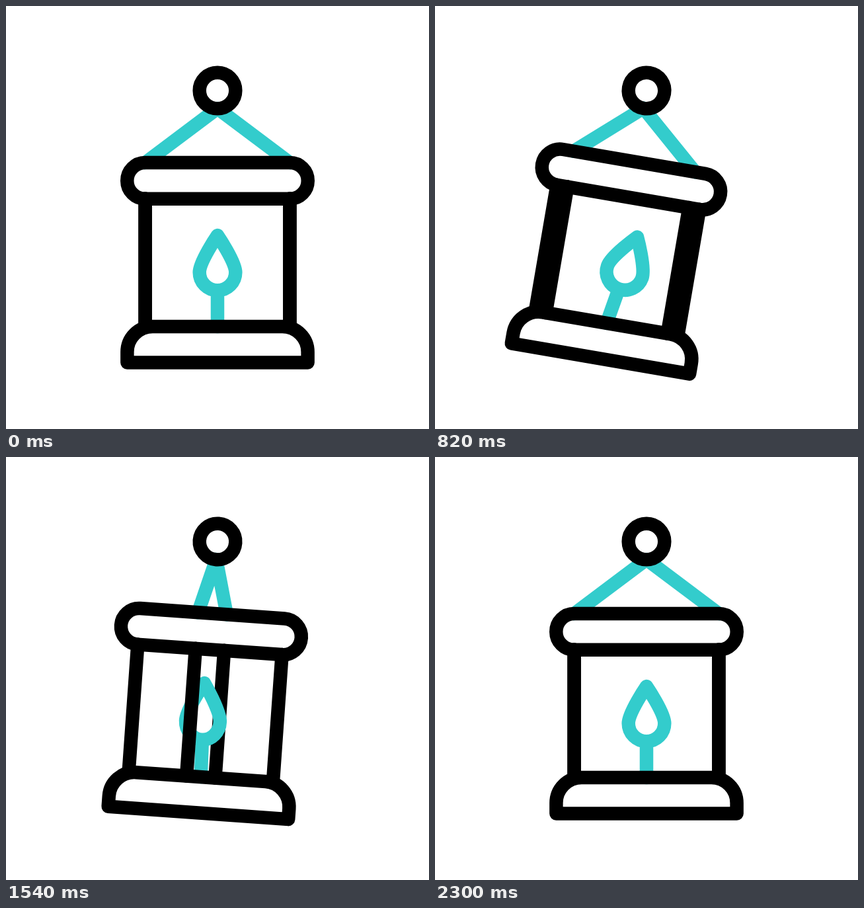
These frames come from a looping animation (640 px wide and 640 px high, 2.4 s). An HTML page with a canvas:

```html
<!DOCTYPE html>
<html lang="en">
<head>
<meta charset="utf-8">
<title>Swinging lantern</title>
<style>
  html, body { margin: 0; width: 100%; height: 100%; overflow: hidden; background: #fff; }
  canvas { display: block; width: 640px; height: 640px; }
</style>
</head>
<body>
<canvas id="stage" width="640" height="640"></canvas>
<script>
const ctx = document.getElementById('stage').getContext('2d');
const LOOP = 2400, STEP = 20, LAST = 2300;
const BLACK = '#000', TEAL = '#33cccc';
const PIVOT = { x: 320, y: 128 };
const HALF = 109.4;    // half distance between the side pillars
const RING = 27.3;
const TURN = 983;      // duration of one half turn of the cage
const WICK_Y = 357;    // foot of the wick, below the pivot

// Tracks of [time, value], eased between neighbours
const SWING = [[0, 0], [600, 22.7], [1165, -15.8], [1724, 10.8], [2240, 0]];
const LEAN = [[0, 0], [710, 11.8], [1275, -8], [1800, 4], [2280, 0]];
const WIDTH = [[0, 1], [300, 1.11], [620, 0.93], [1020, 1.1], [1540, 0.95], [1980, 1.09], [2280, 1]];
const HEIGHT = [[0, 1], [300, 1], [620, 1.05], [1020, 0.955], [1540, 1.03], [1980, 1], [2280, 1]];

const smooth = p => p * p * (3 - 2 * p);
const radians = deg => deg * Math.PI / 180;

function valueAt(track, t) {
  const next = track.findIndex(key => key[0] > t);
  if (next < 0) return track[track.length - 1][1];
  const [t0, v0] = track[next - 1], [t1, v1] = track[next];
  return v0 + (v1 - v0) * smooth((t - t0) / (t1 - t0));
}

// Horizontal place of the front pillar, travelling right to left
function frontPillar(t) {
  if (t >= 2 * TURN) return HALF;
  return HALF * (1 - 2 * smooth((t % TURN) / TURN));
}

function stroke(color) {
  ctx.strokeStyle = color;
  ctx.stroke();
}

function line(color, ...points) {
  ctx.beginPath();
  points.forEach(([x, y]) => ctx.lineTo(x, y));
  stroke(color);
}

const pillar = x => line(BLACK, [x, 163.6], [x, 357]);

// The outline bends and scales, the line weight does not
function flame(t) {
  ctx.save();
  ctx.translate(0, WICK_Y);
  ctx.rotate(radians(valueAt(LEAN, t)));
  ctx.scale(valueAt(WIDTH, t), valueAt(HEIGHT, t));
  ctx.beginPath();
  ctx.moveTo(0, 0);
  ctx.lineTo(0, -54.7);
  ctx.moveTo(0, -138);
  ctx.bezierCurveTo(0, -138, RING, -98, RING, -82);
  ctx.arc(0, -82, RING, 0, Math.PI);
  ctx.bezierCurveTo(-RING, -98, 0, -138, 0, -138);
  ctx.closePath();
  ctx.restore();
  stroke(TEAL);
}

function topBar() {
  const r = 27.35, y = 136.4;
  ctx.beginPath();
  ctx.arc(-HALF, y, r, Math.PI / 2, Math.PI * 1.5);
  ctx.arc(HALF, y, r, -Math.PI / 2, Math.PI / 2);
  ctx.closePath();
  stroke(BLACK);
}

function base() {
  const w = 136.6, r = 38.5, top = 357, bottom = 411.5;
  ctx.beginPath();
  ctx.moveTo(-w, bottom);
  ctx.arc(r - w, top + r, r, Math.PI, Math.PI * 1.5);
  ctx.arc(w - r, top + r, r, -Math.PI / 2, 0);
  ctx.lineTo(w, bottom);
  ctx.closePath();
  stroke(BLACK);
}

function draw(t) {
  const front = frontPillar(t);
  ctx.setTransform(1, 0, 0, 1, 0, 0);
  ctx.fillStyle = '#fff';
  ctx.fillRect(0, 0, 640, 640);
  ctx.lineWidth = 20.5;
  ctx.lineCap = ctx.lineJoin = 'round';
  ctx.translate(PIVOT.x, PIVOT.y);
  ctx.rotate(radians(valueAt(SWING, t)));

  line(TEAL, [-front, 109.1], [0, 27], [front, 109.1]);
  pillar(-front);
  flame(t);
  pillar(front);
  pillar(-HALF);
  pillar(HALF);
  topBar();
  base();

  ctx.beginPath();
  ctx.arc(0, 0, RING, 0, Math.PI * 2);
  stroke(BLACK);
}

function tick() {
  const t = performance.now() % LOOP;
  draw(Math.min(LAST, Math.floor(t / STEP) * STEP));
  requestAnimationFrame(tick);
}
tick();
</script>
</body>
</html>
```
